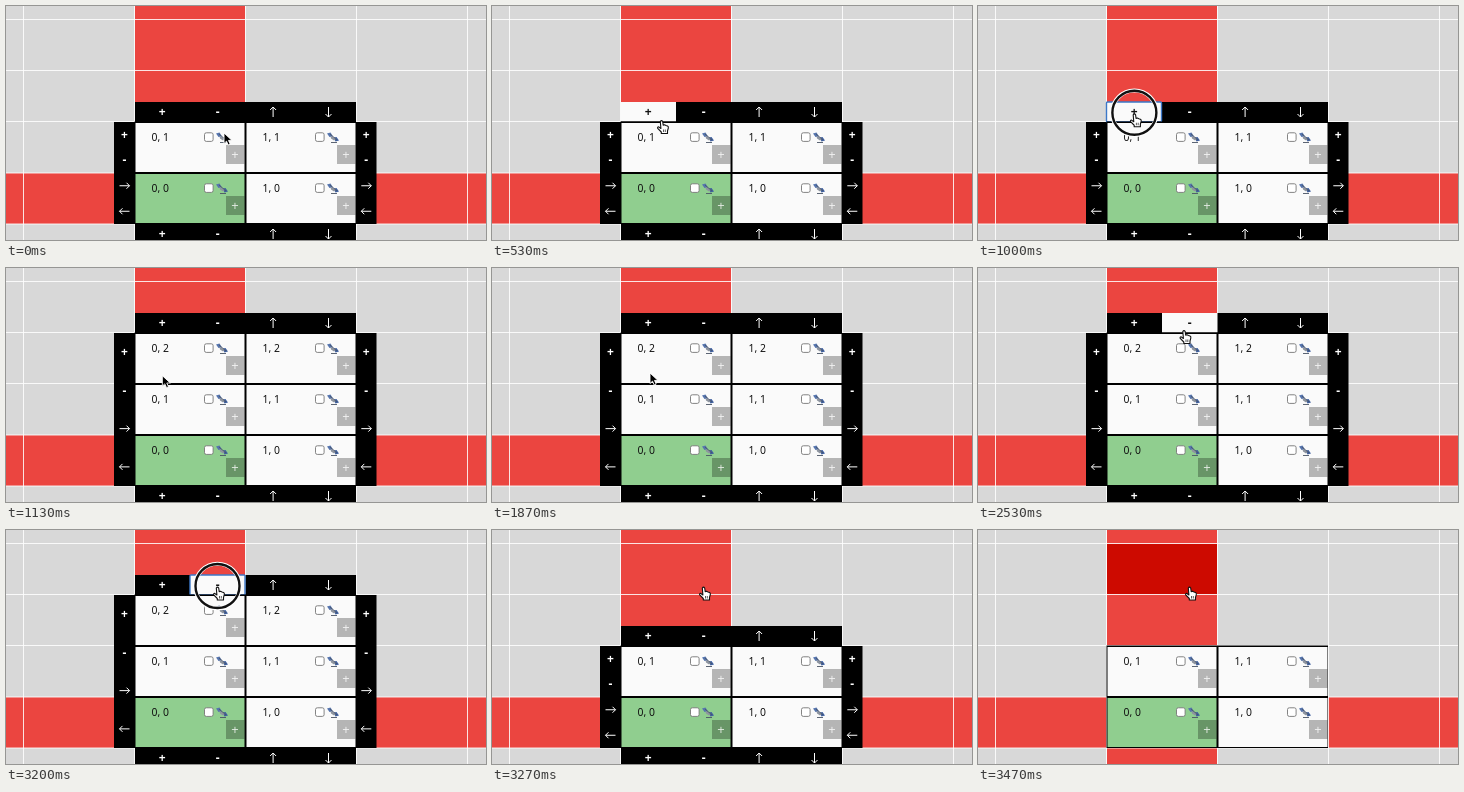
Write an HTML page that moves like this. It is 480 by 234 pixels and loops after 3990 ms.

```html
<!DOCTYPE html>
<html lang="en">
<head>
<meta charset="utf-8">
<title>Cell grid editor</title>
<style>
html, body { margin: 0; width: 100%; height: 100%; overflow: hidden; background: #d8d8d8; }
svg { display: block; width: 100vw; height: 100vh; }
text { font: 10.4px "Noto Sans", "Open Sans", sans-serif; fill: #111; }
.btn { font-size: 12px; font-weight: 600; text-anchor: middle; }
.add { font-size: 13px; text-anchor: middle; fill: #fff; fill-opacity: .8; }
</style>
</head>
<body>
<svg id="stage" viewBox="0 0 480 234"></svg>
<script>
const LOOP = 3990;
const COLS = [17.5, 128.5, 239.5, 350.5, 461.5];
const ROWS = [13.5, 64.5, 115.5, 167, 218];
const RED = '#eb4540';

const rect = (x, y, w, h, fill, more = '') =>
  `<rect x="${x}" y="${y}" width="${w}" height="${h}" fill="${fill}" ${more}/>`;
const path = (d, more) => `<path d="${d}" ${more}/>`;

// The page behind the editor: gray grid with a red cross through the origin.
function backdrop(hot) {
  const lines = COLS.map(x => `M${x} 0V234`).join('') + ROWS.map(y => `M0 ${y}H480`).join('');
  return rect(0, 0, 480, 234, '#d8d8d8') +
    rect(129, 0, 110, 234, RED) + rect(0, 167, 480, 51, RED) +
    (hot ? rect(129, 14, 110, 50, '#cd0a00') : '') +
    path(lines, 'stroke="#fff" stroke-opacity=".85" fill="none"');
}

const satellite = (x, y) => `<g transform="translate(${x} ${y})">` +
  path('M0 1.5L3.5 .5L6 4.5L2.5 5Z', 'fill="#5574ad"') +
  path('M6.5 5.5L9.5 5L12 8.5L8.5 9.5Z', 'fill="#3e5f9e"') +
  path('M3.5 4L9 6.5L7 8.5L4 6.5Z', 'fill="#8d949f"') +
  path('M3 2L10 8M4 10.5H10', 'stroke="#4b5566" stroke-width=".9" fill="none"') + '</g>';

function cell(col, row) {
  const x = 129 + col * 111, y = 167 - row * 51;
  const origin = !col && !row;
  return rect(x + .5, y + 1, 109, 49, origin ? '#90ce8f' : '#fafafa') +
    `<text x="${x + 16.6}" y="${y + 19}">${col}, ${row}</text>` +
    rect(x + 69.5, y + 10.8, 8.6, 8.6, '#fff', 'rx="1.8" stroke="#777" stroke-width=".9"') +
    satellite(x + 81, y + 10) +
    rect(x + 91, y + 23, 18.5, 19, '#000', 'fill-opacity=".28"') +
    `<text class="add" x="${x + 100}" y="${y + 37}">+</text>`;
}

const ARROW = 'M-5 0H5M2 -3L5 0L2 3';
function button(label, x, y, ink = '#fff') {
  const turn = { right: 0, down: 90, left: 180, up: 270 }[label];
  return turn === undefined
    ? `<text class="btn" x="${x}" y="${y + 4.2}" style="fill:${ink}">${label}</text>`
    : path(ARROW, `transform="translate(${x} ${y}) rotate(${turn})" stroke="${ink}" fill="none"`);
}

function bars(rows, hover, focus) {
  const top = 218 - rows * 51, high = rows * 51;
  let out = rect(129, top - 20, 221, 21, '#000') + rect(129, 217, 221, 17, '#000') +
    rect(108, top, 21, high, '#000') + rect(350, top, 20.5, high, '#000');
  if (hover >= 0) {
    const x = 128.5 + hover * 55.5;
    out += rect(x, top - 20, 55.5, 19.5, '#fafafa');
    if (focus) out += rect(x, top - 20, 55, 20, 'none', 'rx="1" stroke="#3c78c8" stroke-width="1.4"');
  }
  ['+', '-', 'up', 'down'].forEach((label, i) => {
    const x = 156.3 + i * 55.4;
    out += button(label, x, top - 10, i === hover ? '#111' : '#fff') + button(label, x, 228);
  });
  ['+', '-', 'right', 'left'].forEach((label, i) => {
    const y = top + high * (i + .5) / 4;
    out += button(label, 118.5, y) + button(label, 360.3, y);
  });
  return out;
}

function editor(rows) {
  let out = rect(128.5, 218 - rows * 51 - .5, 221.5, rows * 51 + .5, '#000');
  for (let r = 0; r < rows; r++) out += cell(0, r) + cell(1, r);
  return out;
}

const POINTER = 'M0 0V10.5L2.5 8.2L4.2 12L6.2 11.1L4.5 7.4H8Z';
const HAND = 'M-1.2 1Q0 -.8 1.2 1L1.7 4.6L3 4.3L4.5 4.9L6 5.4Q7.2 6 6.8 7.6L6 10.5V13H-.2V11.5' +
  'L-3.8 7.8Q-4.3 6.3 -2.8 6.4L-.6 8Z';
const cursor = (x, y, hand) => `<g transform="translate(${x} ${y})">` + (hand
  ? path(HAND, 'fill="#fff" stroke="#111" stroke-width="1.1" stroke-linejoin="round"') +
    path('M2 9V11.5M3.8 9V11.5', 'stroke="#111" stroke-width=".7"')
  : path(POINTER, 'fill="#000" stroke="#fff" stroke-width=".9" stroke-linejoin="round"')) + '</g>';

const ring = (x, y) => `<circle cx="${x}" cy="${y}" r="22.3" fill="none" stroke="#fff" stroke-width="4"/>` +
  `<circle cx="${x}" cy="${y}" r="22" fill="none" stroke="#111" stroke-width="2.4"/>`;

// Cursor stops: tick, x, y
const TRACK = [
  [0, 218, 127], [3, 204, 124], [6, 179, 117], [8, 169.5, 114.5], [11, 156.5, 108],
  [27, 156, 107], [28, 158, 105], [35, 183, 80], [38, 206, 62.5], [42, 211.5, 57], [60, 211.5, 57]
];
function place(n) {
  const i = TRACK.findIndex(k => k[0] > n);
  const [a, ax, ay] = TRACK[i - 1], [b, bx, by] = TRACK[i];
  const u = (n - a) / (b - a);
  return [ax + (bx - ax) * u, ay + (by - ay) * u];
}

const stage = document.getElementById('stage');
let last = -1;

function draw(n) {
  const [x, y] = place(n);
  const rows = n >= 16 && n < 49 ? 3 : 2;
  const shown = n < 50;
  const top = 218 - rows * 51;
  const onBar = shown && y < top && y > top - 20;
  const hover = onBar ? (x < 184 ? 0 : 1) : -1;
  const press = n === 14 || n === 15 || n === 47 || n === 48;
  const hand = onBar || n === 16 || n >= 49;
  stage.innerHTML = backdrop(n >= 50) + (shown ? bars(rows, hover, n === 15 || n === 48) : '') +
    editor(rows) + (press ? ring(x, y - 1) : '') + cursor(x, y, hand);
}

const start = performance.now();
function tick() {
  const t = (performance.now() - start) % LOOP;
  const n = Math.min(59, Math.floor((Math.floor(t / 10) + .4) * .15));
  if (n !== last) draw(last = n);
  requestAnimationFrame(tick);
}
tick();
</script>
</body>
</html>
```
